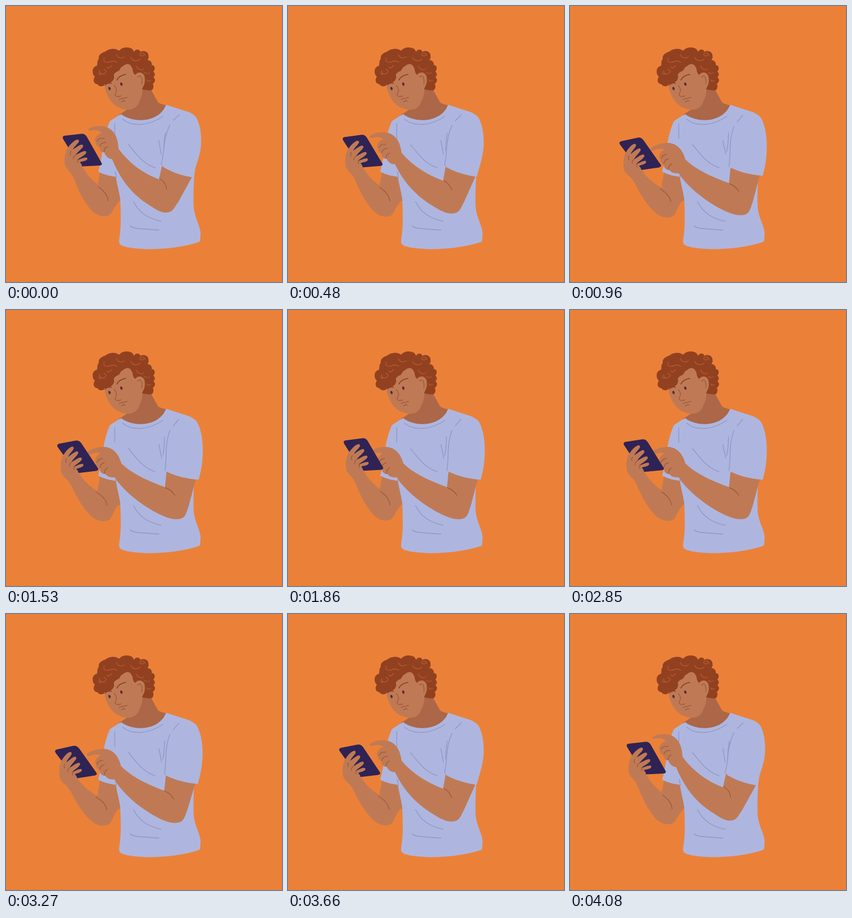
Recreate the animation shown at these times as an HTML page. Size 500 by 500 pixels, loop 4.11 s.

```html
<!DOCTYPE html>
<html>
<head>
<meta charset="utf-8">
<style>
html, body { margin: 0; width: 100%; height: 100%; overflow: hidden; background: #eb8138; }
svg { display: block; width: 100%; height: 100%; }
.skin { fill: #bf7a55; }
.shirt { fill: #aeb6df; }
.line { fill: none; stroke-width: 1.4; stroke-linecap: round; stroke-linejoin: round; }
.fold { stroke: #8e99c4; }
.crease { stroke: #9d5b3b; }
.curl { stroke: #b4592f; }
.brow { stroke: #8a3f20; stroke-width: 1.7; }
</style>
</head>
<body>
<svg viewBox="0 0 500 500">
  <path fill="#ab6747" d="M250 148L263 152L275 174Q279 178 292 180L276 215H222L205 197L222 186Z"/>

  <path class="skin" d="M171 298L166 324L180 362L208 352L201 300Z"/>
  <g class="swing">
    <path class="skin" d="M107 283C108 292 117 299 122 310C130 331 138 350 152 367C160 377 169 381 178 381C186 381 190 378 193 371C197 363 203 357 207 350L190 330L167 324C156 315 145 305 138 291Z"/>
    <path class="line crease" d="M168 328C177 335 184 342 185 353"/>
  </g>

  <path class="shirt" d="M209 196C228 212 277 213 290 179C305 184 320 188 335 194L348 260L341 308C340 325 339 342 340 365C342 385 352 398 352.500 412Q352.500 420 351 427C322 437 290 440 262 440.500C240 440.500 222 438 212 435Q203 432 205 423C209 402 208 375 207 350C205 336 201 323 199 309.500C187 308 176 305 167 300C172 283 174 268 177 246C180 230 184 218 188 209C194 204 201 200 209 196Z"/>
  <path class="line fold" d="M211 205C228 219 258 218 284 200M197 213V240M198 300L200 310M222 251C236 268 248 286 270 293M231 354C240 374 257 385 281 390M225 398Q228 402 238 403L277 406"/>

  <path id="arm" class="skin"/>
  <path id="armLines" class="line crease"/>
  <path id="sleeve" class="shirt"/>
  <path id="sleeveLines" class="line fold"/>

  <path fill="#924120" d="M157 119C157 112 160 110 165 108C166 102 165 99 168 96C167 89 172 85 179 83C186 77 197 75 205 81C210 74 222 73 229 78Q231 81 232 83Q235 77 242 80L243 83C249 79 258 83 258 89C259 93 258 96 256 98C262 98 265 103 264 107C270 107 271 114 267 119C271 122 270 127 267 129C272 133 270 138 266 141C269 147 266 154 260 153L245 151L180 142C176 147 168 146 166 142C158 141 157 133 161 128Q157 125 157 119Z"/>
  <path class="skin" d="M178 142C188 141 196 136 196 128C194 123 198 120 203 118C207 117 206 111 212 109C217 104 225 104 227 110C231 114 228 120 234 125C238 118 249 119 251 128C253 138 250 144 247 149C248 161 243 171 238 180C231 189 219 190 207 185C193 181 181 163 178 142Z"/>
  <path class="line curl" d="M178 94C175 101 182 104 188 101Q194 98 201 102M200 88C202 94 209 96 214 92M226 93C228 100 238 101 243 96M242 87Q248 82 252 89M170 117C169 124 178 126 181 119Q181 115 177 115M183 111C185 114 189 111 191 108M167 121Q169 125 173 123M236 109C239 115 245 117 249 114M250 120Q255 124 260 121M255 134Q258 138 262 135M242 89Q247 92 250 89"/>
  <path class="line brow" d="M180 143Q185 138 191 140M201 134C204 128 210 125 217 124"/>
  <g fill="#5c2b2c">
    <ellipse cx="187.500" cy="149.500" rx="2" ry="3" transform="rotate(-15 187.500 149.500)"/>
    <ellipse cx="209" cy="141.500" rx="2" ry="3" transform="rotate(-15 209 141.500)"/>
  </g>
  <path class="line crease" d="M196 144C201 149 201 154 198 159C196 164 202 165 208 163M205 170Q209 166 213 168Q215 165 219 166M209 174Q212 171 216 172M238 129C243 123 248 130 246 141"/>

  <g class="swing">
    <path fill="#2f2355" d="M106 235L137 231.500Q143 231 146.500 237L173 284Q175.500 288 170 289L138 290.500Q134 290.500 131 286L103.500 241Q101 236 106 235Z"/>
    <path class="skin" d="M122 311C118 300 108 296 106.500 287C105 278 107 266 110 260C115 252 122 244 129 242Q133 242 132 246C129 251 124 254 121 260C127 256 134 251 138 251Q141 253 139 256C135 261 129 265 126 270C133 267 140 262 144 263Q147 265 144 268C139 273 133 275 129 279C136 277 143 273 147 275Q148 278 146 279C142 282 137 281 134 283Q137 286 138 291L151 311Z"/>
    <path class="line crease" d="M118 263Q115 266 117 270M126 270Q122 272 122 277M132 278Q129 280 130 284"/>
  </g>
</svg>
<script>
const LOOP = 4110;

// Each shape as [lowered, raised] with matching commands.
const poses = {
  arm: [
    "M291 291L288 321C262 311 231 299 209 278C205 262 195 249 178 248C164 248 152 253 146 258C145 263 150 263 154 261C160 258 166 258 171 260C164 263 159 272 163 277C163 282 166 286 170 287C170 294 175 298 180 297C183 302 190 304 197 303C207 320 233 344 260 360C282 374 303 382 317 378C326 375 327 366 331 355L344 306Z",
    "M283 288L277 314C250 304 224 286 204 259C203 241 198 225 181 219C168 215 155 219 149 223C149 227 154 226 158 225C164 224 170 226 174 230C166 232 159 240 162 246C162 251 165 254 169 255C169 262 174 266 178 265C180 272 187 278 192 277C203 304 222 338 260 361C275 371 285 377 297 373C304 370 306 363 312 355L338 308Z"
  ],
  armLines: [
    "M165 276Q168 269 175 269M170 286Q171 278 178 277M179 296Q178 289 184 286M289 322Q300 326 306 336",
    "M165 245Q169 238 178 240M170 254Q172 247 181 247M178 264Q177 257 184 255M279 313Q290 320 291 332"
  ],
  sleeve: [
    "M297 216C288 242 290 270 291 293C308 301 328 306 349 307.500C354 290 357 272 356.500 250C356 230 352 212 345 201Q340 196 328 191Z",
    "M297 215C287 240 288 265 283.500 291C300 301 318 307 338 310.500C341 295 353 272 353.500 248C354 230 351 212 344 201Q339 195 328 191Z"
  ],
  sleeveLines: [
    "M297 218C287 244 292 268 288 291M277 244L282 268M287 230Q287 250 284 263M303 210L313 198",
    "M297 215C283 244 288 265 281 287M277 244L281 268M289 230Q285 250 286 262M303 207L314 197"
  ]
};

// Keys are [time, value]; values ease in and out between them.
const raiseKeys = [[0, 1], [150, 1], [950, 0], [3010, 0], [LOOP, 1]];
const swingKeys = [[0, 0], [150, 0], [1150, -6.2], [2290, 1.7], [3390, -6.2], [LOOP, 0]];

function ease(keys, t) {
  const i = keys.findIndex(k => k[0] > t);
  const [t0, a] = keys[i - 1], [t1, b] = keys[i];
  return a + (b - a) * (1 - Math.cos(Math.PI * (t - t0) / (t1 - t0))) / 2;
}

function mix([from, to], k) {
  const ends = to.match(/[\d.]+/g);
  let i = 0;
  return from.replace(/[\d.]+/g, n => (+n + (ends[i++] - n) * k).toFixed(2));
}

const swinging = document.querySelectorAll(".swing");

function draw(now) {
  const time = now % LOOP;
  const t = time < 150 ? 0 : Math.floor(time / 30) * 30;
  const raise = ease(raiseKeys, t);
  for (const id in poses) {
    document.getElementById(id).setAttribute("d", mix(poses[id], raise));
  }
  const turn = `rotate(${ease(swingKeys, t)} 200 376)`;
  swinging.forEach(g => g.setAttribute("transform", turn));
  requestAnimationFrame(() => draw(performance.now()));
}
draw(0);
</script>
</body>
</html>
```
